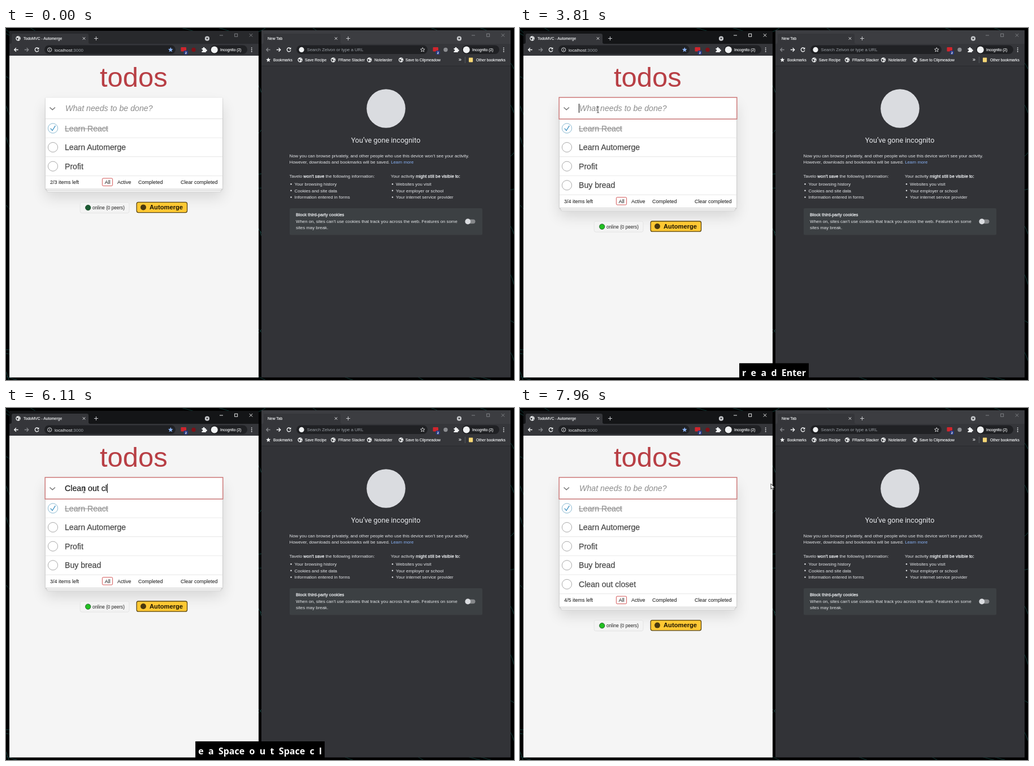
Write an HTML page that moves like this. It is 899 px wide and 623 px high and loops after 8 s.

```html
<!DOCTYPE html>
<html lang="en">
<head>
<meta charset="utf-8">
<title>Todos</title>
<style>
html, body { margin: 0; width: 100%; height: 100%; overflow: hidden; background: #000; }
svg { display: block; width: 899px; height: 623px; }
text { font-family: "Liberation Sans", Arial, sans-serif; white-space: pre; }
.ui { stroke-width: .15; }
.roboto { font-family: Roboto, sans-serif; }
.keys { font-family: "Noto Sans", "Open Sans", sans-serif; font-weight: 700; }
</style>
</head>
<body>
<svg id="stage" viewBox="0 0 899 623" xmlns="http://www.w3.org/2000/svg"></svg>
<script>
const LOOP = 8000;
const ROW = 33.6;
const stage = document.getElementById("stage");

const text = (x, y, size, str, fill, more = "") =>
  `<text x="${x}" y="${y}" font-size="${size}" fill="${fill}" ${more}>${str}</text>`;
const rect = (x, y, w, h, fill, more = "") =>
  `<rect x="${x}" y="${y}" width="${w}" height="${h}" fill="${fill}" ${more}/>`;
const circle = (x, y, r, fill, more = "") =>
  `<circle cx="${x}" cy="${y}" r="${r}" fill="${fill}" ${more}/>`;
const line = (d, color, width = 1, more = "") =>
  `<path d="${d}" fill="none" stroke="${color}" stroke-width="${width}" ${more}/>`;
const ui = (x, y, str, fill = "#f1f3f4", size = 6.75) =>
  text(x, y, size, str, fill, `class="ui" stroke="${fill}"`);

function desktop() {
  let seed = 11;
  const rnd = () => (seed = (seed * 16807) % 2147483647) / 2147483647;
  let out = rect(0, 0, 899, 623, "#000");
  for (let i = 0; i < 26; i++) {
    const x = [-4, 446, 890][i % 3], y = rnd() * 600, slope = rnd() * 70 - 20;
    out += line(`M${x} ${y}q6 ${slope * .3} 13 ${slope}`, "#123f3c", 1);
  }
  for (let i = 0; i < 12; i++) {
    const x = rnd() * 880;
    out += line(`M${x} ${i % 2 ? 617 : -1}l${10 + rnd() * 16} 7`, "#0f3835", 1);
  }
  return out;
}

function globe(x, y) {
  return circle(x, y, 4.2, "#f1f3f4") +
    `<path d="M${x - 3.2} ${y - 1.5}l2.6 .4 1.2 1.6-1.4 1.2-.2 1.8-1.2-1.6z M${x + .6} ${y - 3.4}l1.8 1.4-.9 1z M${x + 1.3} ${y + .6}l1.8 .2-1.4 1.9z" fill="#35363a"/>`;
}

function star(x, y, r, fill, stroke = "none") {
  let pts = "";
  for (let i = 0; i < 10; i++) {
    const a = i * Math.PI / 5 - Math.PI / 2, q = i % 2 ? r * .45 : r;
    pts += `${x + q * Math.cos(a)},${y + q * Math.sin(a)} `;
  }
  return `<polygon points="${pts}" fill="${fill}" stroke="${stroke}" stroke-width=".8"/>`;
}

const cross = (x, y, r, color) =>
  line(`M${x - r} ${y - r}l${2 * r} ${2 * r}m0 ${-2 * r}l${-2 * r} ${2 * r}`, color, .9);

function arrow(x, dir, color) {
  return line(`M${x - dir * 3.5} 38.5h${dir * 7}m${-dir * 3.2} -3.3l${dir * 3.2} 3.3l${-dir * 3.2} 3.3`, color, 1.3);
}

// Window controls change colour with focus.
function controls(x, color) {
  return line(`M${x + 372} 13h6`, color, .9) +
    rect(x + 398.7, 10.2, 5, 5, "none", `stroke="${color}" stroke-width=".9"`) +
    cross(x + 427.5, 12.8, 2.7, color);
}

function toolbar(x, side) {
  const right = side === "right", white = "#f1f3f4", grey = "#85878b";
  return `<path d="M${x + 1} 28q3 0 3-3v-12q0-3 3-3h130q3 0 3 3v12q0 3 3 3z" fill="#35363a"/>` +
    rect(x, 28, 441, right ? 39 : 21, "#35363a") +
    cross(x + 132, 18.5, 2.2, white) +
    line(`M${x + 150} 18.5h7m-3.5 -3.5v7`, "#c8cacd", 1) +
    circle(x + 350, 18.7, 4.1, "#c4c6c9") +
    `<path d="M${x + 348} 17.6h4l-2 2.6z" fill="#202124"/>` +
    arrow(x + 12.2, -1, right ? grey : white) +
    arrow(x + 30.3, 1, right ? white : grey) +
    line(`M${x + 51.3} 36.2a3.4 3.4 0 1 0 .6 3.4`, white, 1.3) +
    `<path d="M${x + 52.4} 34.2v3.6h-3.6z" fill="${white}"/>` +
    rect(x + 62, 30.5, 232, 15.6, "#202124", 'rx="7.8"') +
    rect(x + 303.5, 34, 9.5, 7.5, "#d0252d", 'rx="1"') +
    rect(x + 308.6, 40, 7.4, 7, "#26377e", 'rx="1.4"') +
    text(x + 310.7, 45.8, 6, "2", "#fff", 'font-weight="700"') +
    circle(x + 326, 38.5, 3.7, right ? "#8b8d91" : "#7d1118") +
    `<path d="M${x + 340.5} 36h2.2a1.5 1.5 0 1 1 2.8 0h2.3v2.2a1.5 1.5 0 1 1 0 2.8v2h-7.3v-2.2a1.4 1.4 0 1 0 0-2.7z" fill="${white}"/>` +
    rect(x + 355, 30.5, 66, 15.6, "#202124", 'rx="7.8"') +
    circle(x + 362.8, 38.4, 6, white) +
    ui(x + 373, 41, "Incognito (2)") +
    [35.3, 38.5, 41.7].map(y => circle(x + 428.7, y, .9, white)).join("");
}

function leftWindow() {
  return rect(6, 5, 441, 613.5, "#f5f5f5") +
    rect(6, 5, 441, 23, "#28292c", 'id="bar"') + toolbar(6, "left") +
    `<g id="dim">${controls(6, "#85878b")}</g><g id="lit">${controls(6, "#fff")}</g>` +
    globe(21.5, 18.5) + ui(31, 21, "TodoMVC - Automerge") +
    circle(77.2, 38.5, 3.6, "none", 'stroke="#f1f3f4" stroke-width=".9"') +
    line("M77.2 38v2.4m0 -4v.9", "#f1f3f4", 1) +
    text(86, 41.5, 7.9, 'localhost<tspan fill="#9aa0a6">:3000</tspan>', "#f1f3f4") +
    star(291.3, 38.6, 4.6, "#8ab4f8") +
    text(166, 104, 49, "todos", "#b83f45");
}

function rightWindow() {
  const body = "#e4e6e9", size = 7.85;
  const p = (x, y, str, more) => text(x, y, size, str, body, more);
  const b = s => `<tspan stroke="${body}" stroke-width=".3">${s}</tspan>`;
  const list = (x, entries) => entries.map((s, i) =>
    circle(x + 3, 276.2 + i * 11.6, 1.2, body) + p(x + 9, 279 + i * 11.6, s)).join("");
  const marks = [[520.5, 529, "Save Recipe"], [579, 588, "FRame Stacker"],
    [643, 652, "Notelarder"], [699, 707, "Save to Clipmeadow"]];
  return rect(452, 4, 441, 614.5, "#323337") + rect(452, 4, 441, 24, "#3c3d41") +
    toolbar(452, "right") + controls(452, "#85878b") +
    ui(463, 21, "New Tab") + circle(523, 38.4, 4.6, "#f1f3f4") +
    text(532.5, 41.3, 7.75, "Search Zelvon or type a URL", "#9aa0a6") +
    star(737.3, 38.6, 4, "none", "#f1f3f4") +
    star(464.3, 56.5, 4.3, "#f1f3f4") + ui(473, 59, "Bookmarks") +
    marks.map(([gx, tx, s]) => globe(gx, 56.5) + ui(tx, 59, s)).join("") +
    ui(801, 59.3, "»", "#f1f3f4", 9) +
    line("M812.5 51v11", "#5f6368", .8) + rect(819, 52.4, 7.2, 8, "#f8d775", 'rx=".8"') +
    ui(832, 59, "Other bookmarks") + line("M452 67.2h441", "#28292c", .8) +
    circle(672.5, 142.5, 34.3, "#dadce0") +
    text(672, 202.5, 12.6, "You’ve gone incognito", "#e8eaed", 'class="roboto" text-anchor="middle"') +
    p(501.5, 229, "Now you can browse privately, and other people who use this device won’t see your activity.") +
    p(501.5, 240.3, 'However, downloads and bookmarks will be saved. <tspan fill="#8ab4f8">Learn more</tspan>') +
    p(501.5, 265.2, `Tavelo ${b("won’t save")} the following information:`) +
    list(501.5, ["Your browsing history", "Cookies and site data", "Information entered in forms"]) +
    p(681, 265.2, `Your activity ${b("might still be visible to:")}`) +
    list(681, ["Websites you visit", "Your employer or school", "Your internet service provider"]) +
    rect(502, 319, 341, 47.3, "#3c4043", 'rx="2"') +
    p(513, 333.2, b("Block third-party cookies")) +
    p(513, 344.7, "When on, sites can't use cookies that track you across the web. Features on some") +
    p(513, 356, "sites may break.") +
    rect(813, 338.8, 17.5, 7.4, "#85878a", 'rx="3.7"') + circle(817.3, 342.5, 4.9, "#dadce0");
}

function todoItem(label, i) {
  const y = 178 + i * ROW, done = i === 0;
  return `<g class="item">` + rect(70, 160.5 + i * ROW, 313, ROW, "#fff") +
    line(`M70 ${160.7 + i * ROW}h313`, i ? "#ededed" : "#dcdcdc", .9) +
    circle(83, y - .5, 8.6, "#fff", `stroke="${done ? "#6ba6c4" : "#949494"}" stroke-width=".8"`) +
    (done ? line(`M78.8 ${y - .3}l3.2 3.8 5.4 -8.6`, "#3a8fc0", 1.3) : "") +
    text(104, y + 4.6, 14.1, label, done ? "#949494" : "#484848",
      `stroke="${done ? "#949494" : "#484848"}" stroke-width=".25"`) +
    (done ? line(`M104 ${y + .3}h77`, "#949494", 1.1) : "") + `</g>`;
}

function footer() {
  const f = (x, s, id = "") => text(x, 276, 9, s, "#111", id);
  return rect(73, 287, 307, 3.2, "#f6f6f6", 'stroke="#cfcfcf" stroke-width=".7"') +
    rect(71.5, 284.5, 310, 3.2, "#f6f6f6", 'stroke="#c6c6c6" stroke-width=".7"') +
    rect(70, 261.3, 313, 23.6, "#fff") + line("M70 261.6h313", "#e2e2e2", .9) +
    line("M70 285h313", "#c4c4c4", .7) + f(78, "", 'id="count"') +
    rect(170.4, 266, 18.2, 13.4, "none", 'rx="1.8" stroke="#ce4646" stroke-width=".9"') +
    f(174.7, "All") + f(197, "Active") + f(234, "Completed") + f(309, "Clear completed") +
    rect(131.2, 308.5, 86.8, 19, "#f3f3f3", 'rx="3" stroke="#e2e2e2" stroke-width=".9"') +
    circle(145.2, 318, 4.7, "#1b5a33", 'id="dot" stroke="#164a22" stroke-width=".8"') +
    text(153, 321, 8.2, "online (0 peers)", "#222") +
    rect(231.2, 308.4, 89.4, 18.2, "#ffc833", 'rx="3" stroke="#5a4510" stroke-width="1.3"') +
    circle(243, 317.4, 5, "#4a390f") +
    text(254, 321.3, 11.2, "Automerge", "#1c1503", 'font-weight="700"');
}

stage.innerHTML =
  `<defs><filter id="soft" x="-30%" y="-30%" width="160%" height="170%"><feGaussianBlur stdDeviation="13"/></filter>
   <filter id="near" x="-5%" y="-5%" width="110%" height="110%"><feGaussianBlur stdDeviation="1.2"/></filter>
   <clipPath id="page"><rect x="6" y="49" width="441" height="569"/></clipPath></defs>` +
  desktop() + leftWindow() + rightWindow() +
  `<g clip-path="url(#page)">` +
  rect(70, 137, 313, 162, "#000", 'id="shade" opacity=".13" filter="url(#soft)"') +
  rect(70, 124, 313, 162, "#000", 'id="edge" opacity=".25" filter="url(#near)"') +
  `</g><g id="foot">${footer()}</g>` +
  ["Learn React", "Learn Automerge", "Profit", "Buy bread", "Clean out closet"].map(todoItem).join("") +
  rect(70, 123.3, 313, 37, "#fff") +
  rect(69.2, 122.8, 314.6, 38.4, "none", 'id="ring" stroke="#cf7d7d" stroke-width="1.5"') +
  line("M77.5 140.6l4.7 4.2 4.7 -4.2", "#737373", 1.4) +
  text(105, 147, 14.2, "What needs to be done?", "#8c8c8c", 'id="hint" font-style="italic"') +
  text(104, 147, 14.2, "", "#111", 'id="entry" stroke="#111" stroke-width=".15"') +
  rect(104, 134, 1, 16, "#000", 'id="caret"') +
  line("M136 139.3q2 0 2 1.2q0 -1.2 2 -1.2m-2 1v8.6m-2 1.2q2 0 2 -1.2q0 1.2 2 1.2", "#333", .9, 'id="beam"') +
  `<path id="mouse" d="M0 0v9.6l2.2-2 1.6 3.4 1.6-.7-1.6-3.3h3z" fill="#fff" stroke="#000" stroke-width=".8"/>` +
  `<g id="overlay">${rect(0, 590, 10, 33, "#000", 'id="plate"')}` +
  text(449.5, 613, 16, "", "#fff", 'id="keys" class="keys" text-anchor="middle"') + `</g>`;

const el = {};
stage.querySelectorAll("[id]").forEach(n => el[n.id] = n);
const items = [...stage.querySelectorAll(".item")];
const show = (n, on) => n.setAttribute("visibility", on ? "visible" : "hidden");
const set = (n, key, val) => n.setAttribute(key, val);

// Key press: time, character, time it stays on the key display.
const bread = [[2760, "B", 520], [2860, "u", 520], [2960, "y", 520], [3070, " ", 520], [3170, "b", 560],
  [3280, "r", 590], [3357, "e", 685], [3433, "a", 720], [3510, "d", 770], [3630, "\n", 810]];
const closet = [[5280, "C", 645], [5400, "l", 645], [5555, "e", 645], [5600, "a", 645], [5650, "n", 0],
  [5700, " ", 645], [5760, "o", 645], [5820, "u", 645], [5870, "t", 645], [5930, " ", 645], [5980, "c", 700],
  [6110, "l", 300], [6210, "o", 530], [6300, "s", 500], [6390, "e", 530], [6480, "t", 520], [6620, "\n", 830]];
const strokes = [...bread, ...closet];
const ADD1 = 3630, ADD2 = 6620;
const caretOff = [[0, 1160], [1620, 2050], [2400, 2760], [4040, 4440], [4680, 5040], [7000, 7400], [7750, LOOP]];

const keyName = c => c === " " ? "Space" : c === "\n" ? "Enter" : c === "B" || c === "C" ? "Shift + " + c : c;

function typed(t) {
  const run = t < ADD1 ? bread : t >= 5280 && t < ADD2 ? closet : [];
  return run.filter(k => k[0] <= t).map(k => k[1]).join("").replace(/ /g, "\u00a0");
}

// Pointer sweeps along a quadratic arc in discrete steps.
function sweep(t, start, end, steps, a, c, b) {
  let u = Math.floor((t - start) / (end - start) * (steps - 1) + .001) / (steps - 1);
  u = Math.max(0, Math.min(1, u));
  u = u * u * (3 - 2 * u);
  return [0, 1].map(i => (1 - u) * (1 - u) * a[i] + 2 * u * (1 - u) * c[i] + u * u * b[i]);
}

function draw(t) {
  const focus = Math.max(0, Math.min(1, (t - 1100) / 190));
  const active = t >= 1160;
  set(el.bar, "fill", active ? "#141517" : "#28292c");
  show(el.lit, active);
  show(el.dim, !active);
  set(el.ring, "opacity", active ? focus : 0);

  const extra = t >= ADD2 ? 2 : t >= ADD1 ? 1 : 0;
  items.forEach((n, i) => show(n, i < 3 + extra));
  set(el.foot, "transform", `translate(0 ${extra * ROW})`);
  set(el.shade, "height", 162 + extra * ROW);
  set(el.edge, "height", 162 + extra * ROW);
  el.count.textContent = `${2 + extra}/${3 + extra} items left`;
  set(el.dot, "fill", t < 2760 ? "#1b5a33" : t < ADD1 ? "#1f8030" : "#22c022");

  const str = typed(t);
  el.entry.textContent = str;
  show(el.hint, !str);
  set(el.caret, "x", 104 + (str ? el.entry.getComputedTextLength() : 0));
  show(el.caret, !caretOff.some(([a, b]) => t >= a && t < b));

  const first = t >= 470 && t < 920, last = t >= 7630;
  show(el.beam, t >= 920 && !last);
  show(el.mouse, first || last);
  if (first || last) {
    const [x, y] = first
      ? sweep(t, 470, 920, 9, [767, 79], [450, 250], [138, 140])
      : sweep(t, 7630, 7960, 6, [138, 140], [290, 310], [444, 134]);
    set(el.mouse, "transform", `translate(${x} ${y})`);
  }

  const keys = strokes.filter(k => t >= k[0] && t < k[0] + k[2]).map(k => keyName(k[1]));
  show(el.overlay, keys.length > 0);
  if (keys.length) {
    el.keys.textContent = keys.join("\u00a0\u00a0");
    const w = el.keys.getComputedTextLength() + 10;
    set(el.plate, "x", 449.5 - w / 2);
    set(el.plate, "width", w);
    set(el.overlay, "transform", `translate(0 ${keys.includes("Enter") ? 3.3 : 0})`);
  }
}

const begin = performance.now();
function tick() {
  draw((performance.now() - begin) % LOOP);
  requestAnimationFrame(tick);
}
tick();
</script>
</body>
</html>
```
